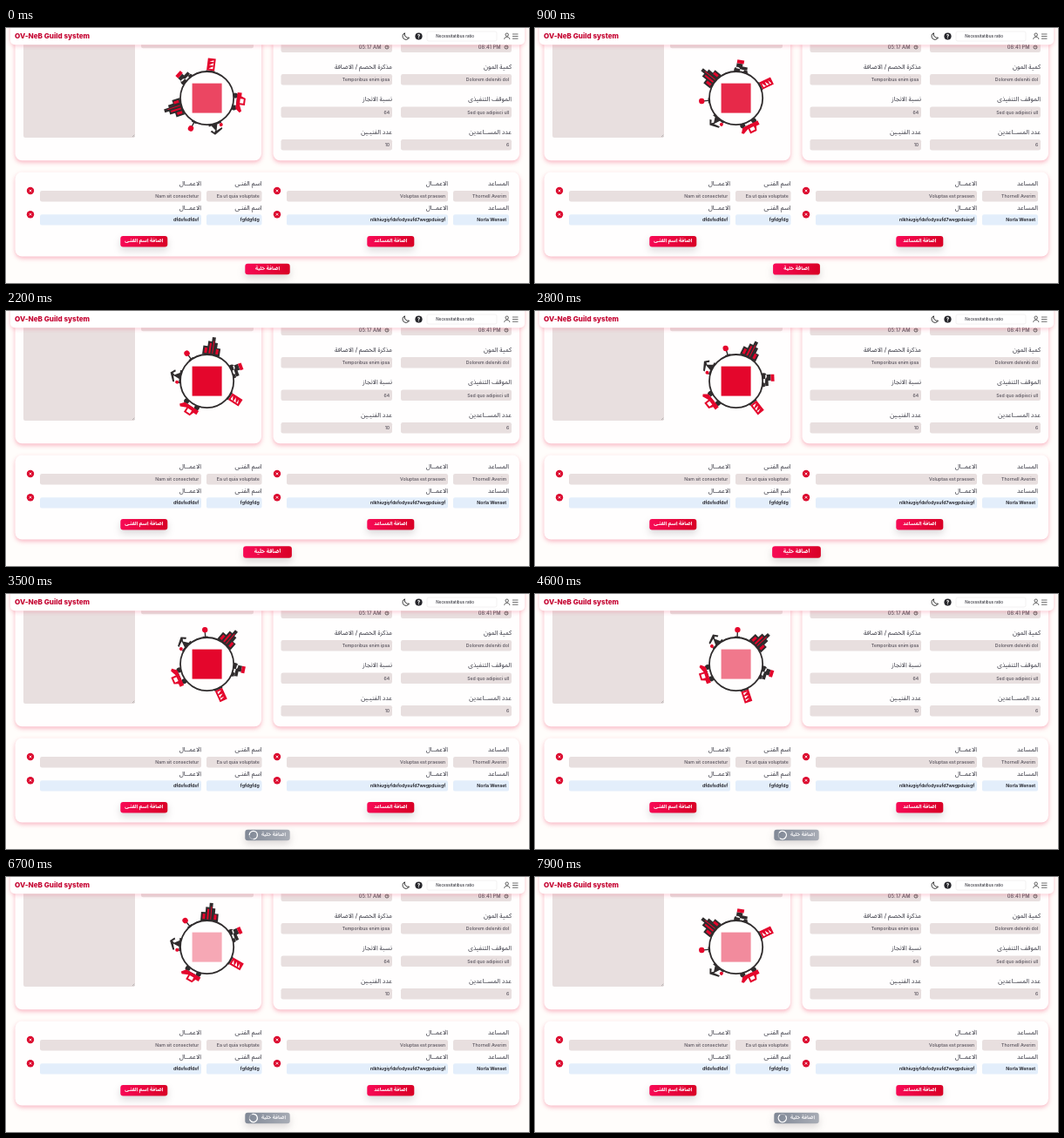
Animation, 600 px wide and 293 px high, one loop 8 s. Source, as an HTML page with a canvas:

```html
<!DOCTYPE html>
<html lang="ar">
<head>
<meta charset="utf-8">
<title>Form</title>
<style>
html, body { margin: 0; width: 100%; height: 100%; overflow: hidden; background: #fffdfb; }
canvas { position: absolute; left: 0; top: 0; width: 600px; height: 293px; }
</style>
</head>
<body>
<canvas id="page"></canvas>
<canvas id="live"></canvas>
<script>
const LOOP = 8000;
const LATIN = 'Inter, "Open Sans", sans-serif';
const ARABIC = '"Noto Sans Arabic", "DejaVu Sans", sans-serif';
const RED = '#e4062c', DARK = '#302c2d', PAPER = '#fffefe';
const FIELD = '#e8dfdf', FILLED = '#e3eefb';
const ADD_CELL = 'اضافة خلية';

function layer(id) {
  const c = document.getElementById(id);
  const ratio = Math.max(1, window.devicePixelRatio || 1);
  c.width = 600 * ratio;
  c.height = 293 * ratio;
  const g = c.getContext('2d');
  g.scale(ratio, ratio);
  return g;
}

function box(g, x, y, w, h, r, fill, stroke) {
  g.beginPath();
  g.roundRect(x, y, w, h, r);
  if (fill) { g.fillStyle = fill; g.fill(); }
  if (stroke) { g.strokeStyle = stroke; g.lineWidth = 0.7; g.stroke(); }
}

function dot(g, x, y, r, fill) {
  g.beginPath();
  g.arc(x, y, r, 0, Math.PI * 2);
  g.fillStyle = fill;
  g.fill();
}

function arc(g, x, y, r, from, to, color, width) {
  g.beginPath();
  g.arc(x, y, r, from, to);
  g.strokeStyle = color;
  g.lineWidth = width;
  g.stroke();
}

function line(g, path, color, width) {
  g.strokeStyle = color;
  g.lineWidth = width;
  g.stroke(new Path2D(path));
}

function text(g, s, x, y, size, color, align = 'right', weight = 500, family = LATIN) {
  g.font = `${weight} ${size}px ${family}`;
  g.textAlign = align;
  g.textBaseline = 'middle';
  g.direction = family === ARABIC ? 'rtl' : 'ltr';
  g.fillStyle = color;
  g.fillText(s, x, y);
}

function shadow(g, color, blur, dy, draw) {
  g.save();
  g.shadowColor = color;
  g.shadowBlur = blur;
  g.shadowOffsetY = dy;
  draw();
  g.restore();
}

function card(g, x, y, w, h) {
  shadow(g, 'rgba(238,60,100,.36)', 5, 2.2, () => box(g, x, y, w, h, 8, PAPER));
}

const label = (g, s, x, y) => text(g, s, x, y, 7.4, '#34343f', 'right', 500, ARABIC);

function field(g, x, y, right, value, filled) {
  box(g, x, y, right - x, 12.4, 2.2, filled ? FILLED : FIELD);
  text(g, value, right - 2.8, y + 6.5, 5.2, filled ? '#16161c' : '#55505a', 'right', filled ? 600 : 500);
}

function button(g, x, y, w, h, caption, shift = 0, busy = false) {
  const fill = g.createLinearGradient(x, y, x + w, y + h);
  fill.addColorStop(0, busy ? '#7f8795' : '#f80a57');
  fill.addColorStop(1, busy ? '#a9adb6' : '#d80024');
  shadow(g, 'rgba(70,60,70,.2)', 9, 4, () => box(g, x, y, w, h, 3, fill));
  text(g, caption, x + w / 2 + shift, y + h / 2, 5.8, busy ? '#f3f3f5' : '#fff', 'center', 600, ARABIC);
}

function clock(g, x, y) {
  arc(g, x, y, 2, 0, Math.PI * 2, '#333', 0.7);
  line(g, `M${x} ${y - 1.3}V${y}H${x + 1}`, '#333', 0.5);
}

function header(g) {
  shadow(g, 'rgba(235,50,90,.27)', 5, 1.2, () => box(g, 5, -6, 590, 25.3, 5, '#fff'));
  text(g, 'OV-NeB Guild system', 10, 10, 8.1, '#c4002f', 'left', 800);
  line(g, 'M457.5 5.8A3.9 3.9 0 1 0 462.5 11A4 4 0 0 1 457.5 5.8Z', '#222', 0.9);
  dot(g, 473.5, 9.5, 4.1, '#26262b');
  text(g, '?', 473.5, 9.8, 6, '#fff', 'center', 800);
  box(g, 483, 4, 80, 11, 2, '#fff', '#eeebec');
  text(g, 'Necessitatibus ratio', 493.3, 9.8, 4.6, '#33333b', 'left');
  line(g, 'M571.8 13V12.4C572 9.6 577.5 9.6 577.7 12.4V13M576.4 7.7A1.7 1.7 0 1 1 573 7.7A1.7 1.7 0 1 1 576.4 7.7', '#333', 0.8);
  line(g, 'M581 7H587.5M581 9.6H587.5M581 12.2H587.5', '#444', 0.8);
}

function drawPage(g) {
  g.fillStyle = '#fffdfb';
  g.fillRect(0, 0, 600, 293);
  card(g, 10.5, -20, 282.5, 172.3);
  card(g, 306.5, -20, 282.5, 172.3);
  card(g, 10.5, 165.5, 578.5, 97);

  box(g, 20, 0, 128, 126, 2, FIELD);
  line(g, 'M145 125L147.3 122.7M146.4 125.2L147.4 124.2', '#777', 0.4);
  box(g, 155, 10, 129, 13.3, 2.2, FIELD);

  [[453, 580, '08:41 PM'], [315.5, 443, '05:17 AM']].forEach(([x, right, time]) => {
    box(g, x, 15, right - x, 13, 2.2, FIELD);
    text(g, time, right - 12.5, 21.8, 5.8, '#55505a');
    clock(g, right - 6, 22);
  });

  [
    ['كمية المون', 'Dolorem deleniti dol', 'مذكرة الخصم / الاضافة', 'Temporibus enim ipsa'],
    ['الموقف التنفيذى', 'Sed quo adipisci ull', 'نسبة الانجاز', '64'],
    ['عدد المســاعدين', '6', 'عدد الفنيـين', '10']
  ].forEach(([a, av, b, bv], i) => {
    const y = 53 + i * 37.5;
    label(g, a, 580, y - 7.4);
    field(g, 453, y, 580, av);
    label(g, b, 443, y - 7.4);
    field(g, 315.5, y, 443, bv);
  });

  [
    ['Thornell Averim', 'Voluptas est praesen', 'Ea ut quia voluptate', 'Nam sit consectetur'],
    ['Norla Wenset', 'nlkhiugiyfdsfodysufd7wegpduisgf', 'fgfdgfdg', 'dfdsfsdfdsf']
  ].forEach((row, i) => {
    const y = 187 + i * 27.2;
    [
      [513, 577, 'المساعد'], [322, 507, 'الاعمــال'],
      [230, 293.5, 'اسم الفنـى'], [39, 224, 'الاعمــال']
    ].forEach(([x, right, name], k) => {
      label(g, name, right, y - 6.8);
      field(g, x, y, right, row[k], i === 1);
    });
    for (const x of [28, 311]) {
      dot(g, x, y, 4.2, '#dc0a2f');
      line(g, `M${x - 1.3} ${y - 1.3}l2.6 2.6m0 -2.6l-2.6 2.6`, '#fff', 0.8);
    }
  });

  button(g, 131.3, 239, 54, 12.6, 'اضافة اسم الفنـى');
  button(g, 414.3, 239, 54, 12.6, 'اضافة المساعد');
  header(g);
}

// Things standing on the ring: place in degrees, dark part, red part; y points outward.
const machines = [
  { at: 0, dark: 'M-10 1V-9H-5V-15H-1V-20H3V-14H6V-8H10V1Z', red: 'M-8-1V-7H-5V-1ZM-3-1V-13H-1V-1ZM1-1V-16H2V-1ZM5-1V-7H8V-1Z' },
  { at: -44, dark: 'M-3 1V-1H-.7V-6H.7V-1H3V1Z', red: 'M-3.2-8.5a3.2 3.2 0 1 0 6.4 0a3.2 3.2 0 1 0-6.4 0Z' },
  { at: -90, dark: 'M-7 1V-1H-2L1-8L-6-6V-8L4-12L8-7L6-6L4-9L2-7L5-1H8V1Z', red: 'M-8-3a2 2 0 1 0 4 0a2 2 0 1 0-4 0Z' },
  { at: 205, dark: 'M-10-1a3 3 0 1 0 6 0a3 3 0 1 0-6 0ZM4-1a3 3 0 1 0 6 0a3 3 0 1 0-6 0ZM-4-5H6V-3H-4Z', red: 'M-11-3V-8H-7L-5-13H3V-7L10-10L12-8L8-3ZM-4-7V-11H1V-7Z' },
  { at: 115, dark: 'M-5 1V-1H5V1Z', red: 'M-4.5-1V-15H4.5V-1ZM-2.5-3L2.5-6V-3ZM-2.5-7L2.5-10V-7ZM-2.5-11L2.5-13V-11Z' },
  { at: 61, dark: 'M-8-1a3.5 3.5 0 1 0 7 0a3.5 3.5 0 1 0-7 0ZM3 0a2.4 2.4 0 1 0 5 0a2.4 2.4 0 1 0-5 0ZM-6-3V-9H1V-6H7V-2Z', red: 'M-6-9V-13H2V-9Z' }
].map(m => ({ at: m.at, dark: new Path2D(m.dark), red: new Path2D(m.red) }));

const rad = deg => deg * Math.PI / 180;

// The ring slows down, turns round at 4.4 s and speeds up the other way.
const ringAngle = t => -43 - 8 * ((t - 4400) / 1000) ** 2;

function drawRing(g, t) {
  g.save();
  g.translate(230.6, 80.6);
  for (const m of machines) {
    g.save();
    g.rotate(rad(ringAngle(t) + m.at + 90));
    g.translate(0, -31);
    g.fillStyle = DARK;
    g.fill(m.dark);
    g.fillStyle = RED;
    g.fill(m.red, 'evenodd');
    g.restore();
  }
  dot(g, 0, 0, 30.6, PAPER);
  arc(g, 0, 0, 30.6, 0, Math.PI * 2, DARK, 1.8);
  g.restore();
}

const smooth = (a, b, t) => {
  const u = Math.min(1, Math.max(0, (t - a) / (b - a)));
  return u * u * (3 - 2 * u);
};

const badgeAlpha = t =>
  0.72 + 0.28 * smooth(-400, 2200, t) - 0.75 * smooth(3500, 5400, t) + 0.22 * smooth(5400, 8200, t);

function drawAddCell(g, t) {
  const busy = t >= 2900;
  const scale = busy ? 1 : 1 + 0.085 * smooth(200, 1500, t);
  g.save();
  g.translate(300, 277);
  g.scale(scale, scale);
  button(g, -25.7, -6.3, 51.4, 12.6, ADD_CELL, busy ? 7 : 0, busy);
  g.restore();
  if (!busy) return;
  const a = t / 1000 * Math.PI * 2;
  arc(g, 283.8, 277, 4.6, 0, Math.PI * 2, 'rgba(255,255,255,.3)', 1.2);
  arc(g, 283.8, 277, 4.6, a, a + Math.PI * 1.5, '#fff', 1.2);
}

function drawLive(g, t) {
  g.clearRect(0, 0, 600, 293);
  drawRing(g, t);
  g.globalAlpha = badgeAlpha(t);
  g.fillStyle = RED;
  g.fillRect(213.6, 63.6, 34, 34);
  g.globalAlpha = 1;
  drawAddCell(g, t);
}

drawPage(layer('page'));
const live = layer('live');
const start = performance.now();

function tick() {
  let t = Math.floor((performance.now() - start) % LOOP / 100) * 100;
  if (t > 4600 && t < 5100) t = 4600; // the page stalls briefly
  drawLive(live, t);
  requestAnimationFrame(tick);
}
tick();
</script>
</body>
</html>
```
